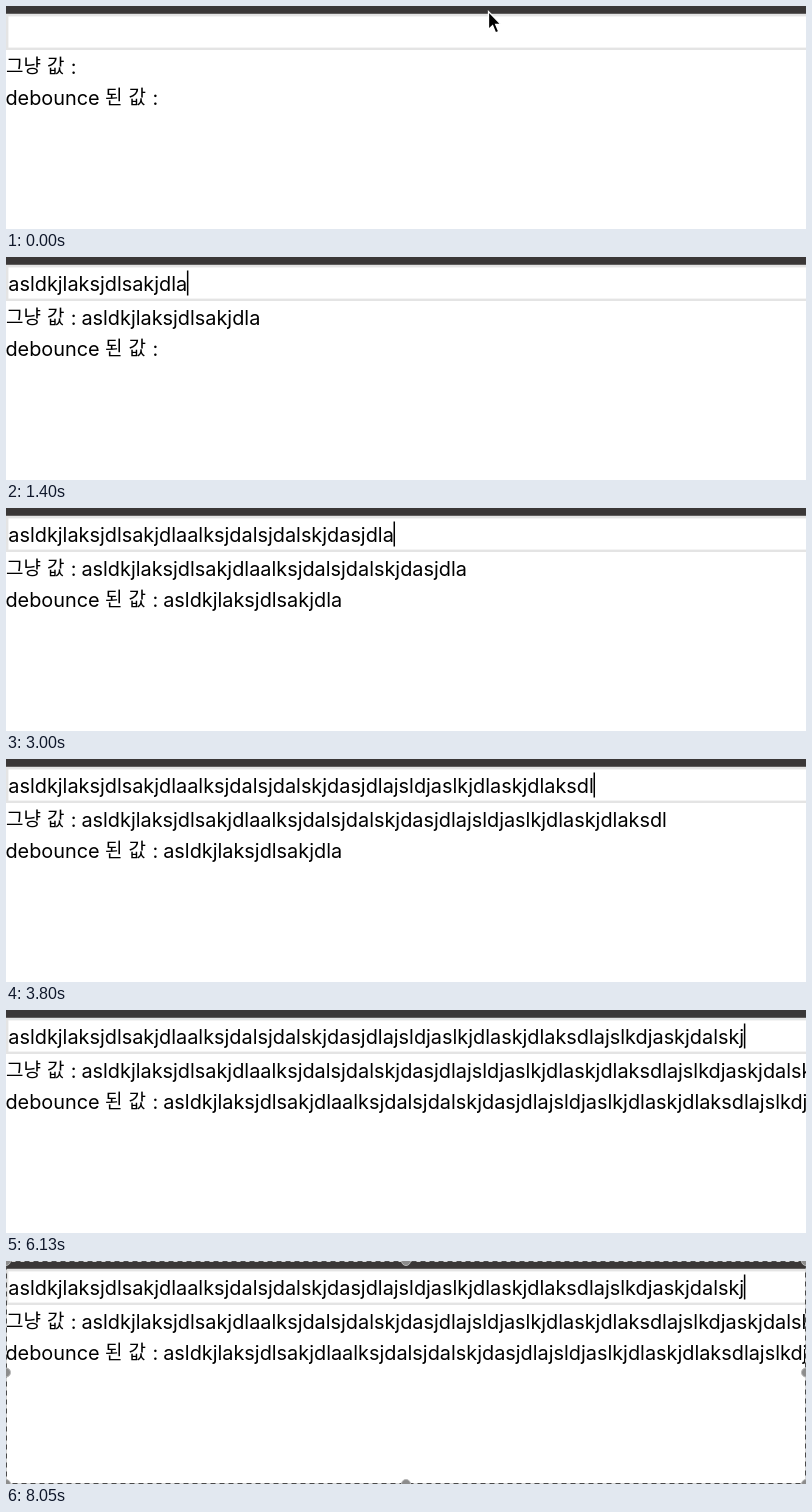
An HTML page that plays this animation: 800 px wide and 223 px high, repeating every 8.17 s.

```html
<!DOCTYPE html>
<html lang="ko">
<head>
<meta charset="utf-8">
<title>debounce</title>
<style>
  html, body { margin: 0; width: 100%; height: 100%; overflow: hidden; background: #fff; }
  svg { display: block; width: 800px; height: 223px; }
  text { font: 19.88px Inter, sans-serif; font-optical-sizing: none; fill: #000; }
  .ko { font: 19px "Noto Sans CJK KR", "Noto Sans CJK", sans-serif; }
</style>
</head>
<body>
<svg viewBox="0 0 800 223">
  <rect width="800" height="223" fill="#fff"/>
  <rect x="1.2" y="9.2" width="820" height="33.6" fill="#fff" stroke="#e4e4e4" stroke-width="2.4"/>
  <rect width="800" height="7.8" fill="#3a3737"/>

  <text id="field" x="2.3" y="33.5"></text>
  <rect id="caret" y="13.5" width="1.5" height="25"/>

  <text class="ko" x="0" y="67">그냥</text>
  <text class="ko" x="41" y="67">값</text>
  <text x="64.8" y="67.5">:</text>
  <text id="live" x="75.4" y="67.5"></text>

  <text x="-0.6" y="98.5">debounce</text>
  <text class="ko" x="99" y="98">된</text>
  <text class="ko" x="122.5" y="98">값</text>
  <text x="146.6" y="98.5">:</text>
  <text id="late" x="157.2" y="98.5"></text>

  <path id="arrow" d="M0 0V18L4.1 14.2L7 21.3L10.2 20L7.2 13H12.6Z" transform="translate(482.5 5.5)"
        fill="#000" stroke="#fff" stroke-width="1.3"/>
  <g id="beam" fill="none" stroke-linecap="round">
    <path d="M-4 -10Q0 -10 0 -7Q0 -10 4 -10M0 -7V7M-4 10Q0 10 0 7Q0 10 4 10" stroke="#000" stroke-width="1.6"/>
  </g>

  <g id="frame">
    <rect x="0.5" y="0.5" width="799" height="222" fill="none" stroke="#d8d8d8"/>
    <rect x="0.5" y="0.5" width="799" height="222" fill="none" stroke="#4a4a4a" stroke-dasharray="5 4"/>
    <g id="grips" fill="#8c8c8c" stroke="#b8b8b8"></g>
  </g>
</svg>
<script>
const LOOP = 8170, STEP = 1000 / 15;
const TYPED = "asldkjlaksjdlsakjdla" + "alksjdalsjdalskjdasjdla" +
  "jsldjaslkjdlaskjdlaksdl" + "ajslkdj" + "askjdalskj";

// [step, letters typed]
const KEYS = [[12, 0], [21, 20], [28, 20], [32, 25], [33, 25], [38, 31], [39, 31], [41, 37],
  [42, 37], [45, 43], [55, 64], [56, 64], [57, 66], [58, 66], [61, 73], [71, 73], [76, 83]];
// caret hidden, ms
const BLINKS = [[0, 200], [670, 870], [1870, 1930], [4530, 4800], [5600, 6000], [6530, 7070], [7600, 8050]];

const $ = id => document.getElementById(id);
const [field, caret, live, late, arrow, beam, frame] =
  ["field", "caret", "live", "late", "arrow", "beam", "frame"].map($);
const show = (el, on) => el.setAttribute("visibility", on ? "visible" : "hidden");
const write = (el, s) => { if (el.textContent !== s) el.textContent = s; };

for (const x of [0, 400, 800])
  for (const y of [0, 111.5, 223]) {
    if (x === 400 && y === 111.5) continue;
    const dot = document.createElementNS("http://www.w3.org/2000/svg", "circle");
    dot.setAttribute("cx", x);
    dot.setAttribute("cy", y);
    dot.setAttribute("r", 4.5);
    $("grips").append(dot);
  }

function lettersAt(t) {
  const step = Math.floor((t + 4) / STEP);
  if (step <= KEYS[0][0]) return 0;
  for (let i = 1; i < KEYS.length; i++) {
    const [s0, n0] = KEYS[i - 1], [s1, n1] = KEYS[i];
    if (step <= s1) return Math.round(n0 + (n1 - n0) * (step - s0) / (s1 - s0));
  }
  return TYPED.length;
}

function draw(t) {
  const text = TYPED.slice(0, lettersAt(t));
  write(field, text);
  write(live, text);
  write(late, TYPED.slice(0, t < 1870 ? 0 : t < 4530 ? 20 : 73));

  const width = text ? field.getComputedTextLength() : 0;
  caret.setAttribute("x", 2 + width);
  show(caret, !BLINKS.some(([a, b]) => t >= a && t < b));

  show(arrow, t < 70);
  show(beam, t >= 70 && t < 870);
  beam.setAttribute("transform", `translate(482 ${t < 130 ? 15 : 18})`);

  const fade = Math.floor((t + 4 - 6600) / STEP) / 4;
  frame.setAttribute("opacity", Math.max(0, Math.min(1, fade)));
}

const start = performance.now();
function tick() {
  draw((performance.now() - start) % LOOP);
  requestAnimationFrame(tick);
}
draw(0);
requestAnimationFrame(tick);
</script>
</body>
</html>
```
